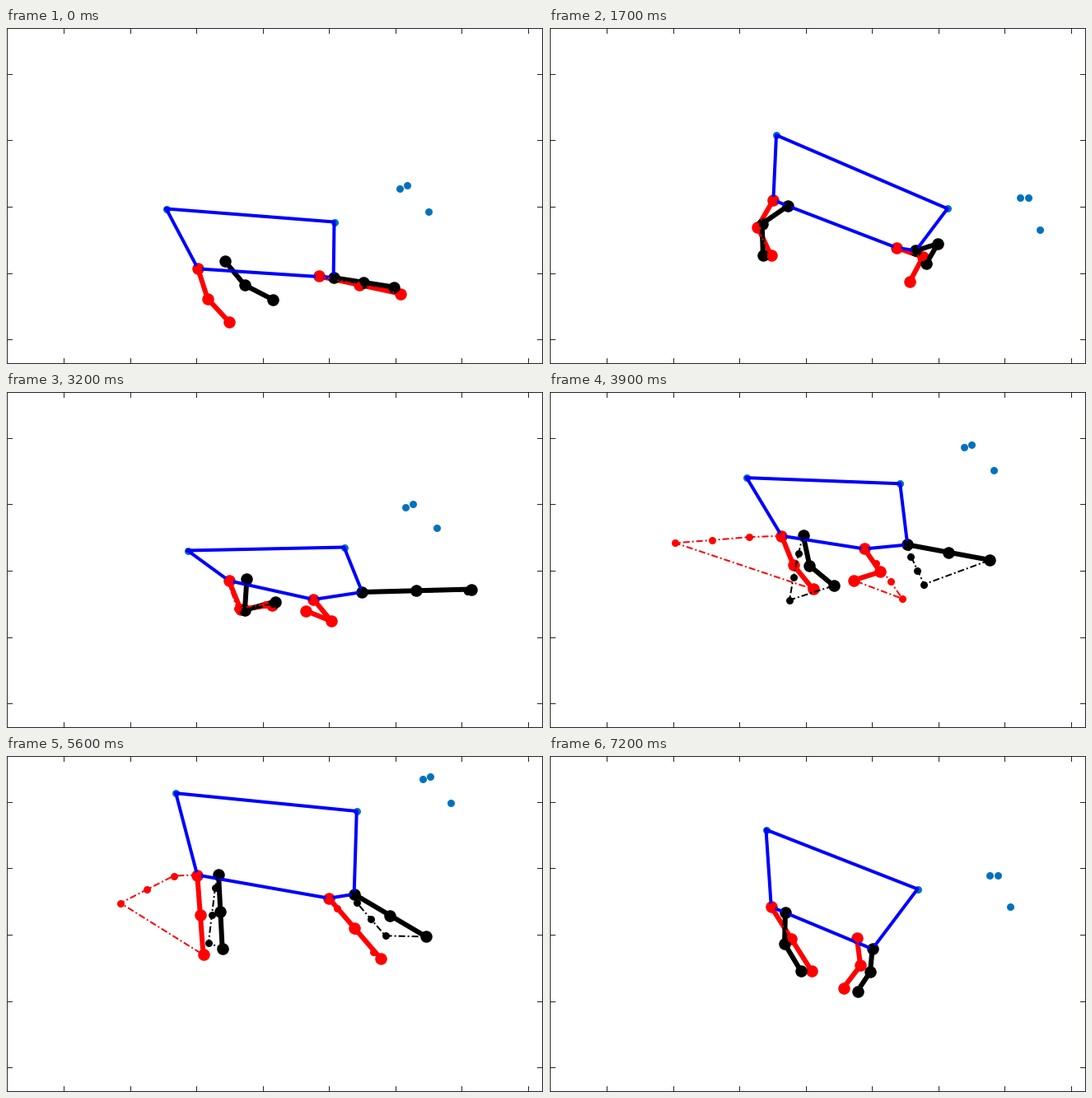
A matplotlib script for the animation above (7.3 s loop, 652 by 408 pixels).

```python
import numpy as np
import matplotlib.pyplot as plt
from matplotlib.animation import FuncAnimation

W, H, DPI = 652, 408, 100
FRAMES, INTERVAL = 73, 100
PX = 72 / DPI

RED, BLACK, BLUE, DOT, AXIS = "#ff0000", "#000000", "#0000ff", "#0072bd", "#262626"

# Key points in pixels from the top left; everything else follows from them
KEYS = np.array([0, 11, 23, 32, 47, 65, 72])
HIP = [(195, 220), (302, 194), (213, 138), (221, 193), (206, 98), (162, 133), (264, 90)]
WITHERS = [(399, 236), (485, 233), (443, 263), (411, 189), (396, 138), (398, 147), (448, 162)]
HIND_RED = [(271, 357), (381, 320), (153, 267), (323, 259), (262, 273), (213, 277), (319, 261)]
HIND_BLACK = [(324, 330), (376, 316), (144, 268), (327, 255), (309, 269), (208, 268), (306, 261)]
FORE_RED = [(479, 323), (415, 329), (443, 315), (364, 266), (368, 249), (477, 309), (358, 282)]
FORE_BLACK = [(471, 315), (407, 320), (504, 281), (565, 240), (464, 225), (500, 286), (375, 286)]

HEAD = np.array([(76, -47), (85, -51), (113, -21)])  # from the withers, along the back
PULL = np.array([0.2, 0.45])  # how far a foot drags the top of its leg along


def track(points, tension=0.5):
    """Smooth path through the key points."""
    v = np.array(points, float)
    slope = np.gradient(v, KEYS, axis=0) * tension

    def at(t):
        i = min(np.searchsorted(KEYS, t, side="right"), len(KEYS) - 1) - 1
        h = KEYS[i + 1] - KEYS[i]
        u = (t - KEYS[i]) / h
        a = u * u * (3 - 2 * u)
        return (v[i] * (1 - a) + v[i + 1] * a
                + h * u * (1 - u) * (slope[i] * (1 - u) - slope[i + 1] * u))

    return at


def leap(t):
    """Ballistic rise of the body between two key poses."""
    i = min(np.searchsorted(KEYS, t, side="right"), len(KEYS) - 1)
    return 0.88 * (t - KEYS[i - 1]) * (KEYS[i] - t) * np.array([0.5, -1])


def flick(t):
    """How far the dashed chains swing out: none at landing, most in mid stride."""
    stride = 0.0533 * t + 0.000225 * t * t
    return np.sin(np.pi * stride) ** 2


def hull(points):
    """Closed convex hull by the monotone chain method."""
    pts = sorted(map(tuple, points))

    def half(seq):
        out = []
        for p in seq:
            while len(out) > 1:
                (ax, ay), (bx, by) = out[-2:]
                if (bx - ax) * (p[1] - ay) - (by - ay) * (p[0] - ax) > 0:
                    break
                out.pop()
            out.append(p)
        return out

    return np.array(half(pts)[:-1] + half(pts[::-1]))


fig = plt.figure(figsize=(W / DPI, H / DPI), dpi=DPI, facecolor="white")
ax = fig.add_axes([0, 0, 1, 1])
ax.set_xlim(0, W)
ax.set_ylim(H, 0)
ax.axis("off")


def rule(x0, y0, x1, y1):
    ax.plot([x0 + 0.5, x1 + 0.5], [y0 + 0.5, y1 + 0.5],
            color=AXIS, lw=PX, zorder=1, snap=False)


def draw_box(left=1, right=651, top=0, bottom=407, size=6):
    for y in (top, bottom):
        rule(left, y, right, y)
    for x in (left, right):
        rule(x, top, x, bottom)
    for k in range(8):
        x = round(70 + 80.57 * k)
        rule(x, top, x, top + size)
        rule(x, bottom, x, bottom - size)
    for k in range(5):
        y = round(56 + 80.5 * k)
        rule(left, y, left + size, y)
        rule(right, y, right - size, y)


def line(color, width, z, dot=0, **style):
    return ax.plot([], [], color=color, lw=width * PX, zorder=z,
                   marker="o" if dot else "", ms=dot * PX, mew=0,
                   solid_joinstyle="round", snap=False, **style)[0]


class Leg:
    """Two links from the trunk to a foot, with a looser dashed chain beside them."""
    STEPS = np.array([[0.3], [0.65], [1.0]])

    def __init__(self, color, feet, top, reach, bend, link, z):
        self.foot = track(feet)
        self.top, self.reach = np.array(top), np.array(reach)
        self.bend, self.link = bend, link
        self.solid = line(color, 6, z, 14.5)
        self.chain = line(color, 2, z + 4, 9, linestyle=(0, (4, 1.5, 1, 1.5)))

    def knee(self, root, foot):
        dx, dy = foot - root
        span = max(np.hypot(dx, dy), 1)
        out = np.sqrt(max(self.link ** 2 - span ** 2 / 4, 0))
        return (root + foot) / 2 + self.bend * out / span * np.array([dy, -dx])

    def pose(self, t, anchor, turn, rise):
        foot = self.foot(t) + rise / 2 - 0.5
        root = anchor + turn @ (self.top + PULL * (foot - anchor))
        joints = np.array([root, self.knee(root, foot), foot])
        f = flick(t)
        loose = (1 - f) * joints + f * (root + self.STEPS * self.reach)
        self.solid.set_data(*joints.T)
        self.chain.set_data(*np.vstack([root, loose, foot]).T)
        return root


draw_box()
hip_path, withers_path = track(HIP), track(WITHERS)
dots = line(DOT, 0, 2, 9, linestyle="none")
outline = line(BLUE, 4, 5)
hind_legs = [Leg(RED, HIND_RED, (29, 8), (-140, 5), -1, 38, 3),
             Leg(BLACK, HIND_BLACK, (50, 8), (-20, 80), -1, 38, 4)]
fore_legs = [Leg(RED, FORE_RED, (-29, 28), (50, 62), 1, 34, 3),
             Leg(BLACK, FORE_BLACK, (-10, 32), (15, 50), 1, 28, 4)]


def update(t):
    rise = leap(t)
    hip, withers = (path(t) + rise - 0.5 for path in (hip_path, withers_path))
    c, s = (withers - hip) / np.hypot(*(withers - hip))
    turn = np.array([[c, -s], [s, c]])
    roots = [leg.pose(t, anchor, turn, rise)
             for anchor, legs in ((hip, hind_legs), (withers, fore_legs))
             for leg in legs]
    dots.set_data(*np.vstack([hip, withers, withers + HEAD @ turn.T]).T)
    outline.set_data(*hull([hip, withers, *roots]).T)
    return [dots, outline]


anim = FuncAnimation(fig, update, frames=FRAMES, interval=INTERVAL,
                     init_func=lambda: update(0), repeat=True, repeat_delay=0)
plt.show()
```
